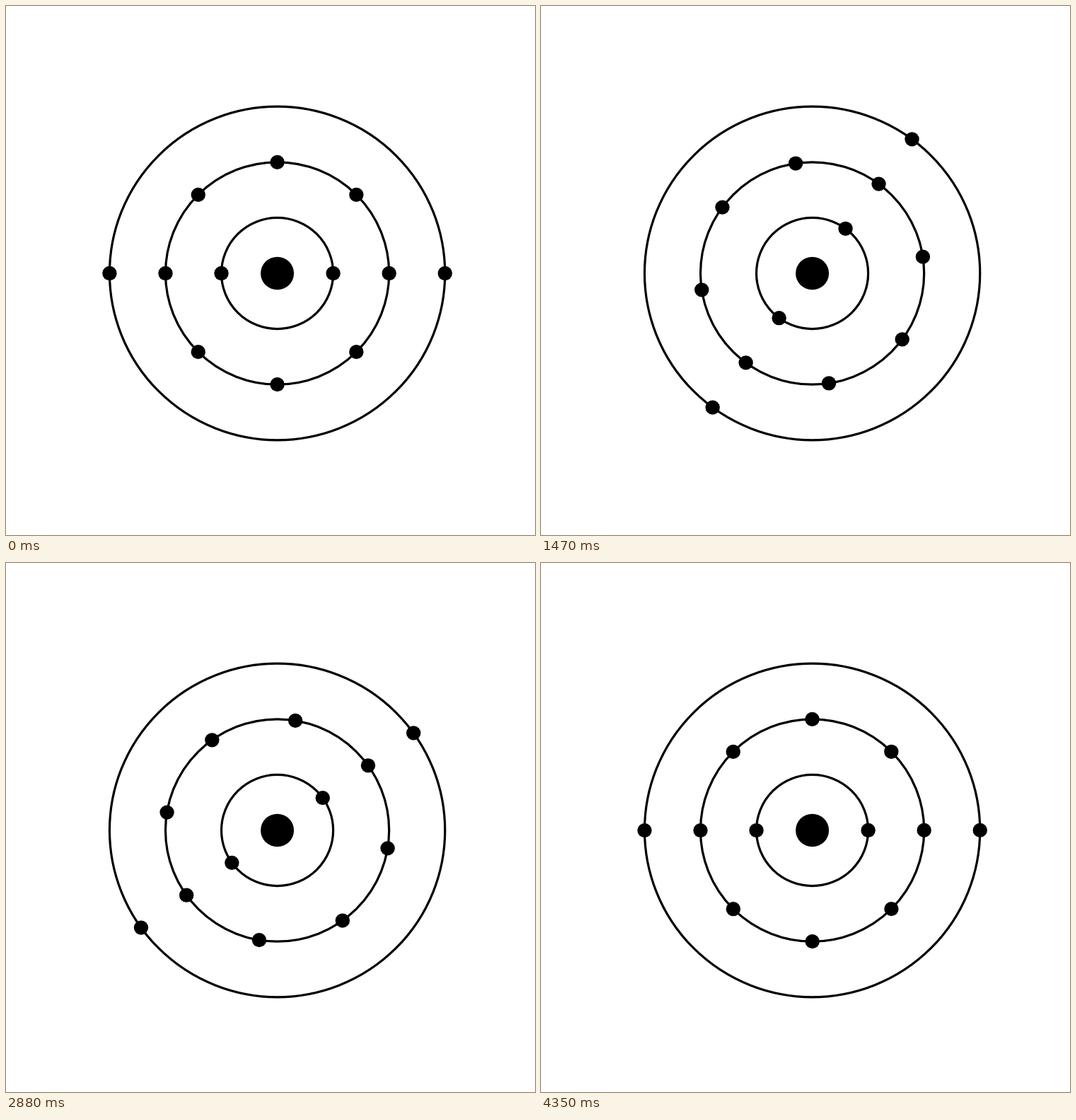
Recreate the animation shown at these times as an HTML page with a canvas. Size 748 by 748 pixels, loop 4510 ms.

```html
<!DOCTYPE html>
<html lang="en">
<head>
<meta charset="utf-8">
<title>Spinning shells</title>
<style>
  html, body { margin: 0; width: 100%; height: 100%; overflow: hidden; background: #fff; }
  canvas { display: block; width: 748px; height: 748px; }
</style>
</head>
<body>
<canvas id="stage" width="748" height="748"></canvas>
<script>
const ctx = document.getElementById('stage').getContext('2d');

const LOOP = 4510;
const STEP = 30;
const LAST = 145;
const SPIN_STEPS = 150;
const SPIN = 765 * Math.PI / 180;

const CENTER = { x: 383.6, y: 378 };
const SCALE = { x: 1, y: 0.9943 };
const GAP = 79.05;
const SHELLS = [2, 8, 2];

function disc(x, y, r) {
  ctx.beginPath();
  ctx.arc(x, y, r, 0, Math.PI * 2);
  ctx.fill();
}

// Cubic ease-out into the rest pose; the loop opens on the rest pose itself.
function angleAt(time) {
  const step = Math.min(LAST, Math.floor(time / STEP));
  return step === 0 ? 0 : -SPIN * (1 - step / SPIN_STEPS) ** 3;
}

function draw(time) {
  const angle = angleAt(time);
  ctx.setTransform(1, 0, 0, 1, 0, 0);
  ctx.fillStyle = '#fff';
  ctx.fillRect(0, 0, 748, 748);

  ctx.setTransform(SCALE.x, 0, 0, SCALE.y, CENTER.x, CENTER.y);
  ctx.fillStyle = ctx.strokeStyle = '#000';
  ctx.lineWidth = 3.2;
  disc(0, 0, 23.5);

  SHELLS.forEach((count, i) => {
    const r = GAP * (i + 1);
    ctx.beginPath();
    ctx.arc(0, 0, r, 0, Math.PI * 2);
    ctx.stroke();
    for (let k = 0; k < count; k++) {
      const a = angle + k * Math.PI * 2 / count;
      disc(r * Math.cos(a), r * Math.sin(a), 10.2);
    }
  });
}

const start = performance.now();
function tick() {
  draw((performance.now() - start) % LOOP);
  requestAnimationFrame(tick);
}
tick();
</script>
</body>
</html>
```
